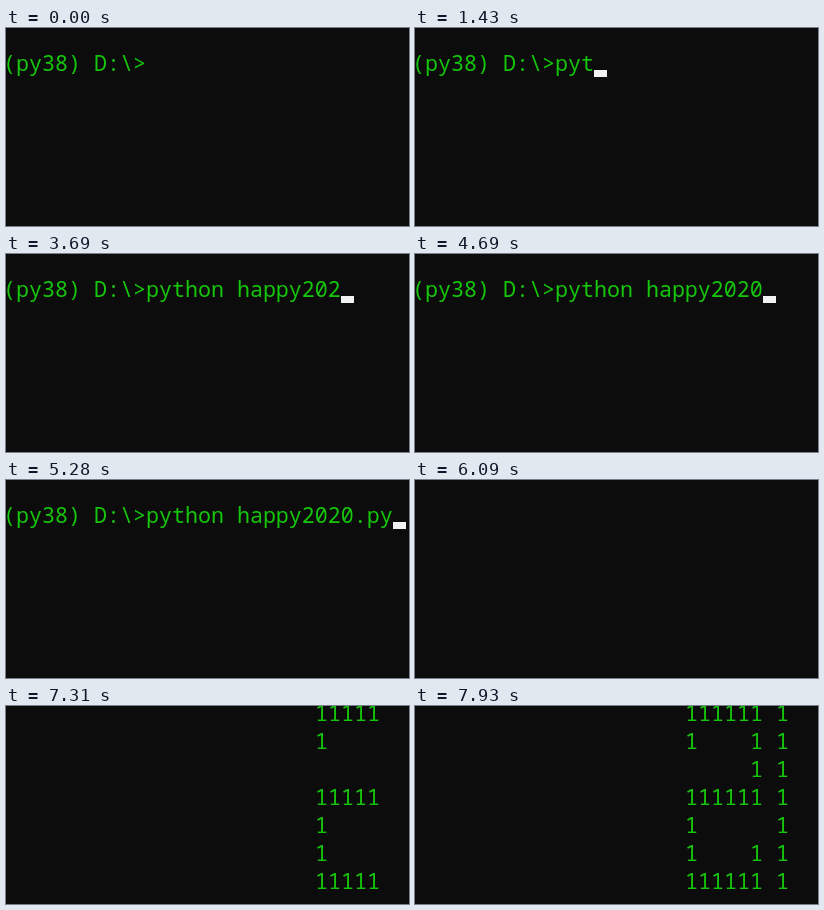
Write an HTML page that moves like this. It is 403 by 198 pixels and loops after 8000 ms.

```html
<!DOCTYPE html>
<html lang="en">
<head>
<meta charset="utf-8">
<title>Terminal</title>
<style>
  html, body { margin: 0; width: 100%; height: 100%; overflow: hidden; background: #0c0c0c; }
  svg { display: block; width: 403px; height: 198px; }
  text {
    font: 21.667px "Noto Sans Mono", "DejaVu Sans Mono", monospace;
    fill: #16c60c;
    white-space: pre;
  }
  #cursor { fill: #f2f2f2; }
</style>
</head>
<body>
<svg id="screen" viewBox="0 0 403 198">
  <rect id="cursor" width="13" height="7"/>
</svg>
<script>
const LOOP = 8000, CELL = 13, LINE = 28, LEFT = -3, TOP = -7, BASE = 22;
const PROMPT = '(py38) D:\\>', COMMAND = 'python happy2020.py';
const RIGHT = 29; // first column past the banner's visible edge

// [time, typed characters, cursor shown]
const TYPING = [
  [0, 0, 0],
  [1020, 1, 1], [1220, 2, 1], [1430, 3, 1], [1630, 4, 1], [1830, 6, 1],
  [2040, 7, 0], [2250, 7, 1], [2440, 7, 0],
  [2860, 9, 1], [3060, 10, 1], [3270, 12, 1], [3470, 13, 1], [3690, 15, 1], [3860, 16, 1],
  [4080, 16, 0], [4690, 16, 1], [4890, 17, 1], [5090, 18, 1], [5280, 19, 1]
];
const ENTER = 5680, IDLE = 5880, CLEAR = 6090;
// each time brings in one more banner column
const SCROLL = [6290, 6690, 6900, 7100, 7310, 7520, 7730, 7930];
const BANNER = [
  '111111 1',
  '1    1 1',
  '     1 1',
  '111111 1',
  '1      1',
  '1    1 1',
  '111111 1'
];

const screen = document.getElementById('screen');
const cursor = document.getElementById('cursor');
const lines = BANNER.map((_, row) => {
  const line = document.createElementNS('http://www.w3.org/2000/svg', 'text');
  line.setAttribute('y', TOP + row * LINE + BASE);
  screen.insertBefore(line, cursor);
  return line;
});

function write(row, col, text) {
  lines[row].setAttribute('x', LEFT + col * CELL);
  if (lines[row].textContent !== text) lines[row].textContent = text;
}

function placeCursor(row, col, shown) {
  cursor.setAttribute('x', LEFT + col * CELL);
  cursor.setAttribute('y', TOP + row * LINE + 21);
  cursor.setAttribute('visibility', shown ? 'visible' : 'hidden');
}

function drawPrompt(t) {
  const [, typed, shown] = TYPING.filter(step => step[0] <= t).pop();
  lines.forEach((_, row) => write(row, 0, row === 1 ? PROMPT + COMMAND.slice(0, typed) : ''));
  if (t < ENTER) placeCursor(1, PROMPT.length + typed, shown);
  else placeCursor(2, 0, t < IDLE);
}

function drawBanner(t) {
  const cols = SCROLL.filter(time => time <= t).length;
  BANNER.forEach((text, row) => write(row, RIGHT - cols, text.slice(0, cols)));
  placeCursor(0, 0, false);
}

const start = performance.now();
function frame(now) {
  const t = Math.max(0, now - start) % LOOP;
  if (t < CLEAR) drawPrompt(t);
  else drawBanner(t);
  requestAnimationFrame(frame);
}
frame(start);
</script>
</body>
</html>
```
